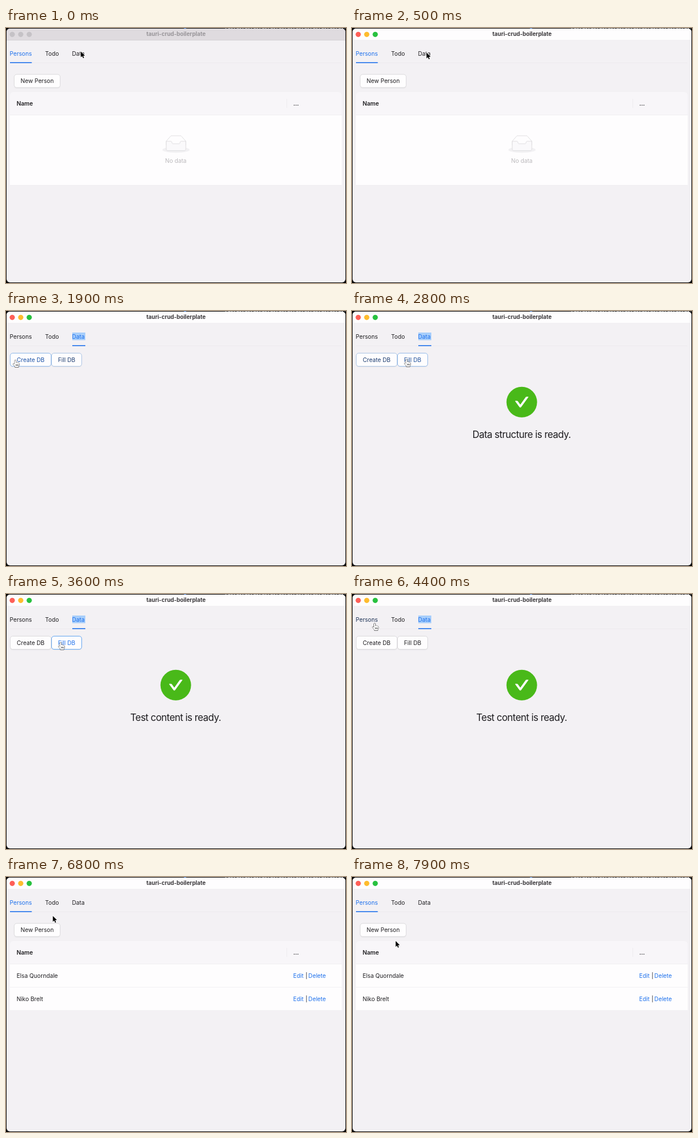
Animation, 600 px wide and 450 px high, one loop 8000 ms. Source, as an HTML page with a canvas:

```html
<!DOCTYPE html>
<html lang="en">
<head>
<meta charset="utf-8">
<style>
  html, body { margin: 0; width: 100%; height: 100%; overflow: hidden; background: #000; }
  canvas { display: block; width: 600px; height: 450px; }
</style>
</head>
<body>
<canvas id="stage"></canvas>
<script>
const LOOP = 8000, STEP = 100;
const INK = [30, 29, 32], BLUE = [29, 112, 236], GREY = [217, 215, 218];
const ACTIVATE = 500, OPEN_DATA = 600, SELECT = 900, CREATE = 2300, FILL = 3200, OPEN_PERSONS = 5265;

const TABS = [{ x: 7, w: 38.5 }, { x: 69, w: 24 }, { x: 117, w: 23 }];

// time, x, y of the pointer tip
const PATH = [
  [0, 132, 41.5], [100, 131.5, 42.5], [200, 131.5, 43.5], [1300, 131.5, 43.5],
  [1600, 110, 76], [1900, 16.5, 86.5], [2400, 16.5, 86.5], [2750, 96.5, 85.5],
  [3600, 96.5, 85.5], [3900, 54, 68], [4200, 45, 57], [4400, 40, 51.5],
  [4800, 28, 38.5], [6600, 28, 38.5], [6900, 110, 84], [7300, 321, 157],
  [7500, 300, 153], [7900, 77, 113], [8000, 77, 113]
];

const EMPTY_LID = new Path2D("M55 12.8L44.9 1.3C44.4.5 43.7 0 42.9 0H21.1c-.8 0-1.5.5-2 1.3L9 12.8V22h46z");
const EMPTY_BOX = new Path2D("M41.6 15.9c0-1.6 1-2.9 2.2-2.9H55v18.1C55 33.3 53.7 35 52 35H12c-1.7 0-3-1.7-3-3.9V13h11.2c1.2 0 2.2 1.3 2.2 2.9s1 2.9 2.2 2.9h14.8c1.2 0 2.2-1.3 2.2-2.9z");
const CHECK = new Path2D("M193.5-146.3l-210.6 292a31.8 31.8 0 0 1-51.7 0L-193.5-27.1c-3.8-5.3 0-12.7 6.5-12.7h46.9c10.2 0 19.9 4.9 25.9 13.3l71.2 98.8 157.2-218c6-8.3 15.6-13.3 25.9-13.3H187c6.5 0 10.3 7.4 6.5 12.7z");
const ARROW = new Path2D("M0 0V10.2L2.4 8 4.1 11.8 5.7 11.1 4.1 7.4 7.3 7.2Z");
const HAND = new Path2D("M-1.2 1.2Q-1.2 0 0 0T1.2 1.2V4.6Q2.8 3.8 3.5 5 4.8 4.4 5.3 5.6 6.7 5.3 6.7 6.8V8.8Q6.6 10.2 5.6 11.2V12.8H-.6V11.4Q-2 9.8-3.8 7.4C-4.4 6.4-3 5.6-2.2 6.6L-1.2 7.7Z");

const canvas = document.getElementById("stage");
const ctx = canvas.getContext("2d");
const ratio = window.devicePixelRatio || 1;
canvas.width = 600 * ratio;
canvas.height = 450 * ratio;

const clamp = v => Math.max(0, Math.min(1, v));
const lerp = (a, b, p) => a + (b - a) * p;
const ease = p => p < .5 ? 4 * p ** 3 : 1 - 4 * (1 - p) ** 3;
const mix = (a, b, p) => `rgb(${a.map((v, i) => Math.round(lerp(v, b[i], p)))})`;
const pulse = (t, on, off) => clamp((t - on) / 300) * (1 - clamp((t - off) / 300));

function rect(x, y, w, h, fill) {
  ctx.fillStyle = fill;
  ctx.fillRect(x, y, w, h);
}

function disc(x, y, r, fill) {
  ctx.fillStyle = fill;
  ctx.beginPath();
  ctx.arc(x, y, r, 0, 7);
  ctx.fill();
}

function text(str, x, y, { color = mix(INK, INK, 0), size = 10.2, weight = 400, align = "left", spacing = 0 } = {}) {
  ctx.font = `${weight} ${size}px Inter, sans-serif`;
  ctx.letterSpacing = spacing + "px";
  ctx.textAlign = align;
  ctx.fillStyle = color;
  ctx.fillText(str, x, y);
}

function at(x, y, scale, draw) {
  ctx.save();
  ctx.translate(x, y);
  ctx.scale(scale, scale);
  draw();
  ctx.restore();
}

function pill(x, y, w, h, r) {
  ctx.beginPath();
  ctx.roundRect(x, y, w, h, r);
}

function button(label, x, y, w, hover = 0, sinceClick = -1) {
  if (sinceClick >= 0 && sinceClick < 400) {
    const p = sinceClick / 400, grow = 5 * ease(p);
    ctx.fillStyle = `rgba(${BLUE},${.25 * (1 - p)})`;
    pill(x - grow, y - grow, w + 2 * grow, 24 + 2 * grow, 4.5 + grow);
    ctx.fill();
  }
  ctx.fillStyle = "rgba(0,0,0,.03)";
  pill(x, y + 1.5, w, 24, 4.5);
  ctx.fill();
  pill(x + .4, y + .4, w - .8, 23.2, 4.5);
  ctx.fillStyle = "#fefdfe";
  ctx.fill();
  ctx.strokeStyle = mix(GREY, [80, 155, 240], hover);
  ctx.lineWidth = .9;
  ctx.stroke();
  text(label, x + w / 2, y + 15.7, { align: "center", color: mix(INK, BLUE, hover) });
}

function windowFrame(active) {
  rect(0, 0, 600, 450, "#000");
  for (let x = 387; x < 598; x += 5) rect(x, 0, 2 + x * 7 % 3, 1, "#777");
  rect(314, 0, 4, 1, "#2a62b8");
  pill(1, 1, 598, 448, 6);
  ctx.fillStyle = "#f3f1f4";
  ctx.fill();
  pill(1, 1, 598, 21, [6, 6, 0, 0]);
  ctx.fillStyle = active ? "#fefdfe" : "#dfdbdf";
  ctx.fill();
  rect(1, 21.3, 598, .7, active ? "#ebe9ec" : "#d3d0d3");
  ["#fe5f57", "#febc2e", "#28c13f"].forEach((c, i) => disc(11 + 15 * i, 11.3, 4.6, active ? c : "#c5c2c6"));
  text("tauri-crud-boilerplate", 300, 14.4, { weight: 700, size: 9.8, align: "center", color: active ? "#3a383b" : "#989599" });
}

function tabs(t) {
  const toData = clamp((t - OPEN_DATA) / 300), toPersons = clamp((t - OPEN_PERSONS) / 300);
  const onData = toData * (1 - toPersons);
  const slide = ease(toData) * (1 - ease(toPersons));
  rect(7, 61.3, 585, .7, "#ebe9ec");
  if (t >= SELECT && t < OPEN_PERSONS) rect(117, 38, 23, 13.5, "#a7cefb");
  const persons = Math.max(1 - onData, pulse(t, 4320, 9000));
  text("Persons", TABS[0].x - .5, 48.6, { color: mix(INK, BLUE, persons) });
  text("Todo", TABS[1].x, 48.6);
  text("Data", TABS[2].x - .5, 48.6, { color: mix(INK, BLUE, onData) });
  rect(lerp(TABS[0].x, TABS[2].x, slide), 60.4, lerp(TABS[0].w, TABS[2].w, slide), 1.6, mix(BLUE, BLUE, 0));
}

function emptyTable() {
  rect(7, 154, 585.5, 123.5, "#fefdfe");
  at(276, 189.4, .75, () => {
    ctx.fillStyle = "#f2f1f3";
    ctx.beginPath();
    ctx.ellipse(32, 34, 32, 7, 0, 0, 7);
    ctx.fill();
    ctx.translate(0, 1);
    ctx.strokeStyle = "#d6d4d7";
    ctx.lineWidth = 1;
    ctx.stroke(EMPTY_LID);
    ctx.fillStyle = "#faf9fb";
    ctx.fill(EMPTY_BOX);
    ctx.stroke(EMPTY_BOX);
  });
  text("No data", 299.7, 237.8, { align: "center", color: "#bbb9bc" });
  rect(7, 277.3, 585.5, .7, "#eeecef");
}

function personRow(name, y) {
  const link = { color: mix(BLUE, BLUE, 0) };
  rect(7, y, 585.5, 41, "#fefdfe");
  text(name, 18.7, y + 24);
  text("Edit", 506.8, y + 24, link);
  text("|", 528.4, y + 24);
  text("Delete", 533.6, y + 24, link);
  rect(7, y + 40.3, 585.5, .7, "#eeecef");
}

function personsPage(filled) {
  button("New Person", 14, 81.5, 82);
  pill(7, 113, 585.5, 41, [6, 6, 0, 0]);
  ctx.fillStyle = "#f8f6f9";
  ctx.fill();
  text("Name", 18.7, 137, { weight: 600 });
  text("...", 507, 137, { weight: 600 });
  rect(495, 125, .8, 16, "#ebe9ec");
  rect(7, 153.3, 585.5, .7, "#eeecef");
  if (!filled) return emptyTable();
  personRow("Elsa Quorndale", 154);
  personRow("Niko Brelt", 195);
}

function dataPage(t) {
  button("Create DB", 7, 74, 73, pulse(t, 1700, 2620), t - CREATE);
  button("Fill DB", 80, 74, 54, Math.max(pulse(t, 1500, 1720), pulse(t, 2620, 3760)), t - FILL);
  if (t < CREATE) return;
  disc(299.6, 160.8, 27, "#49b919");
  at(299.6, 160.8, 54 / 896, () => {
    ctx.fillStyle = "#fefdfe";
    ctx.fill(CHECK);
  });
  const message = t < FILL ? "Data structure is ready." : "Test content is ready.";
  text(message, 299.3, 224.2, { size: 17, spacing: -.55, align: "center" });
}

function pointer(t) {
  const i = PATH.findIndex(p => p[0] > t);
  const [a, b] = [PATH[i - 1], PATH[i]];
  const p = (t - a[0]) / (b[0] - a[0]);
  const x = lerp(a[1], b[1], p), y = lerp(a[2], b[2], p);
  const dataOpen = t >= OPEN_DATA && t < OPEN_PERSONS;
  const onButton = dataOpen
    ? x > 7 && x < 134 && y > 74 && y < 98
    : x > 14 && x < 96 && y > 81 && y < 106;
  const onTab = x > 7 && x < 46 && y > 31 && y < 62;
  const hand = onButton || onTab;
  const shape = hand ? HAND : ARROW;
  at(x, y, 1, () => {
    ctx.lineJoin = "round";
    ctx.lineWidth = hand ? 1 : 1.5;
    ctx.strokeStyle = hand ? "#111" : "#fff";
    ctx.fillStyle = hand ? "#fff" : "#000";
    ctx.stroke(shape);
    ctx.fill(shape);
    if (!hand) return;
    ctx.lineWidth = .7;
    for (const fx of [1.2, 3, 4.8]) {
      ctx.beginPath();
      ctx.moveTo(fx, 7.6);
      ctx.lineTo(fx, 10.4);
      ctx.stroke();
    }
  });
}

function render(t) {
  ctx.setTransform(ratio, 0, 0, ratio, 0, 0);
  windowFrame(t >= ACTIVATE);
  tabs(t);
  if (t >= OPEN_DATA && t < OPEN_PERSONS) dataPage(t);
  else personsPage(t >= OPEN_PERSONS);
  pointer(t);
}

const start = performance.now();
function tick() {
  const t = (performance.now() - start) % LOOP;
  render(Math.floor(t / STEP) * STEP);
  requestAnimationFrame(tick);
}
tick();
</script>
</body>
</html>
```
